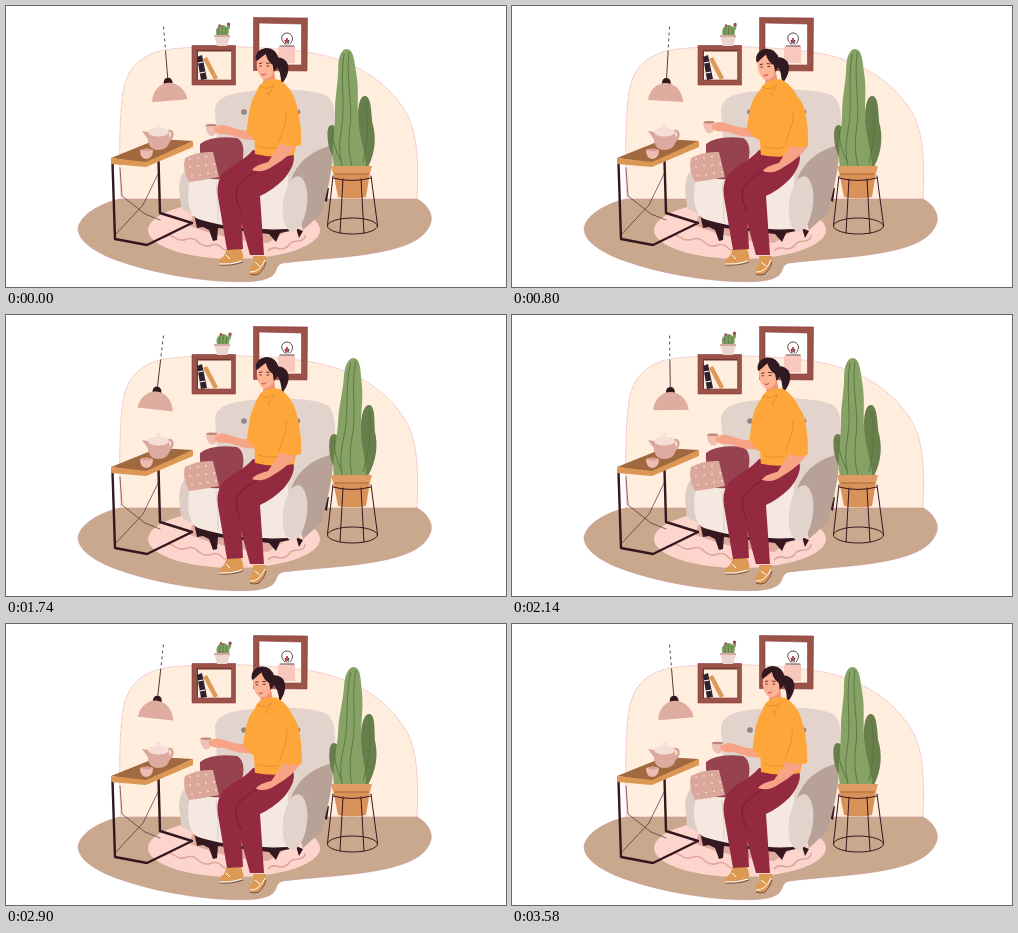
An HTML page that plays this animation: 500x281 px, repeating every 3.6 s.

```html
<!DOCTYPE html>
<html lang="en">
<head>
<meta charset="utf-8">
<title>Tea at home</title>
<style>
  html, body { margin: 0; width: 100%; height: 100%; overflow: hidden; background: #fff; }
  svg { display: block; width: 100vw; height: 100vh; }
  .line { fill: none; stroke: #35171f; stroke-linecap: round; stroke-linejoin: round; }
</style>
</head>
<body>
<svg viewBox="0 0 500 281">
  <!-- room -->
  <path fill="#ffeede" stroke="#d98a9a" stroke-width=".7" stroke-dasharray="1 1" d="M115 194C113 160 113 112 117 86C121 60 138 46 165 43C205 39 254 40 300 46C340 52 373 69 393 96C411 118 413 147 411 194Z"/>
  <path fill="#caa88e" stroke="#c28f8e" stroke-width=".5" d="M113 193H411C421 198 427 208 425 216C420 233 400 241 374 246C344 252 309 253 277 257C269 259 272 265 266 270C256 277 236 276 212 275C172 272 128 262 100 250C81 241 72 232 72 222C75 209 91 199 113 193Z"/>
  <ellipse cx="228" cy="224" rx="86" ry="29" fill="#fdd5cd"/>
  <path fill="none" stroke="#dda79d" stroke-width="1.5" d="M159 232q2-5 9-1q6 5 13 2q7-2 12 4q6 5 13 2q6-2 11 4q6 4 12 1M262 245q4-5 12-2q6 0 9-4q2-4 10-4q6-1 6-6"/>
  <path fill="#dfab9f" d="M186 210L282 224L262 237Q222 235 184 220Z"/>

  <!-- shelf and frame -->
  <path fill="#9b5247" stroke="#8c3a45" stroke-width=".6" fill-rule="evenodd" d="M186 39.500H229.500V79H186ZM190.500 44V74H225.500V44Z"/>
  <path fill="#71382f" d="M190.500 44H225.500V45.500H192V74H190.500Z"/>
  <path fill="#2f202d" d="M191 51L196 49L201 73L195 74Z"/>
  <path stroke="#fff" stroke-width="1.2" d="M192 57l5-1M194 67l5-1"/>
  <path fill="#dc9a58" d="M197 53L201 51L212 72L208 74Z"/>
  <path fill="#9b5247" stroke="#8c3a45" stroke-width=".6" fill-rule="evenodd" d="M247.500 11.500L301.500 12L301 65L247.500 64.500ZM253 17V59H295.500V18Z"/>
  <path fill="#f8c8be" d="M272 41L289 40V57H272Z"/>
  <path class="line" stroke-width=".8" d="M279 38C273 33 276 27 281 27S289 33 284 38M274 40H288M280 38l-1-4 2 2 2-2-1 4"/>
  <path stroke="#c84b55" stroke-width="2" d="M281 32v5"/>

  <!-- small cactus -->
  <g id="sprout">
    <ellipse cx="216.500" cy="26" rx="6.500" ry="7" fill="#7f9e64"/>
    <path stroke="#7f9e64" stroke-width="3" stroke-linecap="round" d="M219 25q4-1 4-5"/>
    <path stroke="#56703f" stroke-width=".7" fill="none" d="M213 22v8M216.500 20v9M220 22v7"/>
    <circle cx="223" cy="18.500" r="1.700" fill="#a94850"/>
    <circle cx="214" cy="19.500" r="1.300" fill="#a94850"/>
  </g>
  <path fill="#ecd5ce" d="M208 29H224V31L221 40H211Z"/>
  <path fill="#d5aaa2" d="M208 29H224V31H208Z"/>

  <!-- lamp -->
  <g id="lamp">
    <path class="line" stroke-width=".8" stroke-dasharray="2 4" d="M157.500 21V45"/>
    <path class="line" stroke-width=".8" d="M157.500 45V75"/>
    <path fill="#35171f" d="M153 78q0-6 4.500-6t4.500 6z"/>
    <path fill="#dfada0" d="M140 95C141 84 149 77 157.500 77S174 84 175.500 95Z"/>
  </g>

  <!-- armchair -->
  <path fill="#35171f" d="M188 208L240 217L285 220L284 225L274 227L270 236L263 228L212 222L211 234L207 235L203 224L197 221L191 222ZM290 222L297 225L293 232ZM316 183L323 182L321 196L316 193Z"/>
  <path fill="#e2d3cc" d="M209 103C211 90 225 87 250 84.500C282 82 309 84 321 90C331 97 330 117 326 148L300 182H214Z"/>
  <g fill="#938480"><circle cx="238" cy="106" r="2.800"/><circle cx="292" cy="106" r="2.400"/></g>
  <path fill="#b8a297" d="M327 139C306 144 289 157 284 178L297 224L316 207C320 188 328 163 327 139Z"/>
  <path fill="#dccdc6" d="M173 182C174 168 179 161 188 161L215 164L210 212C193 211 179 207 175 201Z"/>
  <path fill="#f4e8e0" d="M183 178C187 166 199 168 212 167L282 166V223C245 225 207 219 190 212C182 206 181 190 183 178Z"/>
  <path fill="none" stroke="#dccdc6" d="M210 176Q213 197 212 216"/>
  <ellipse cx="289" cy="198" rx="12" ry="28" fill="#e2d3cc" transform="rotate(7 289 198)"/>
  <path fill="#96424f" d="M194 138Q205 129 231 132Q239 136 237 151L233 174L204 173Q193 160 194 138Z"/>
  <path fill="#dca79b" d="M179 152Q192 145 207 146L213 171Q199 174 183 176Q176 163 179 152Z"/>
  <path fill="none" stroke="#fff0e8" stroke-width="1.500" stroke-linecap="round" stroke-dasharray=".1 8" d="M184 153l22-3M184 161l25-3M186 170l24-4"/>

  <!-- table and tea set -->
  <path class="line" stroke-width=".6" d="M114 162L116 190L139 208L154 214M109 229L137 199L153 166"/>
  <path class="line" stroke-width="2.400" d="M106.500 157L109 233L141 239L186 217M152.500 154L154 207L186 217"/>
  <path fill="#a1693f" d="M105 152L152 133L187 135L140 157Z"/>
  <path fill="#dc9754" d="M105 152L140 156L187 135V141L140 161L105 158Z"/>
  <path fill="none" stroke="#d8a497" stroke-width="2.500" d="M159 126c9-4 10 4 2 11"/>
  <path fill="#d8a497" d="M136 125L142 126L145 135L147 140Z"/>
  <path fill="#dcaa9e" d="M142 126H163Q167 144 151 144Q140 143 142 126Z"/>
  <ellipse cx="152.500" cy="126" rx="10.500" ry="4.500" fill="#f4ded6"/>
  <ellipse cx="152.500" cy="119.500" rx="2" ry="1.800" fill="#f4ded6"/>
  <path fill="#edbcb1" d="M134 144Q141 141 147 144Q147 152 141 153Q134 153 134 144Z"/>
  <ellipse cx="141" cy="144" rx="5" ry="1.200" fill="#d69f92"/>

  <!-- floor cactus -->
  <g id="cactus">
    <g fill="#687f4b">
      <path d="M337 161C326 154 322 142 322 129Q322 118 327 119Q332 120 333 131L341 149Z"/>
      <path d="M348 161C352 142 353 124 353 106C354 94 357 89 361 90C366 92 366 102 367 116C371 130 370 146 362 161Z"/>
    </g>
    <path fill="#86a264" d="M328 162C325 143 330 124 330 106C330 90 334 76 334 60C335 47 339 43 343 43C350 44 350 54 352 68C355 87 351 101 354 123C356 138 360 148 360 162Z"/>
    <path fill="none" stroke="#587344" stroke-width=".9" d="M340 48C335 76 341 98 336 124Q332 144 336 160M345 46C341 76 349 98 344 126Q342 146 346 160M361 97Q365 127 357 157M327 125Q327 140 335 155"/>
  </g>
  <path fill="#d9925a" d="M326 161H365L360 191Q346 194 332 191Z"/>
  <path fill="#c57d48" d="M328 166H363L362 169H329Z"/>
  <path fill="#df9d65" d="M325 160H366L364 167H327Z"/>
  <path class="line" stroke-width="1" d="M327 170L321.500 219M365 170L371.500 219M337 173L334 227M355 173L358 227M327 172Q346 177 365 172"/>
  <ellipse class="line" stroke-width="1" cx="346.500" cy="220" rx="25" ry="8"/>

  <!-- person -->
  <path fill="#dd9a55" d="M221 243L235 243Q239 252 236 255Q224 260 213 258Q213 253 218 250ZM247 250H260Q260 261 253 267Q247 272 243 266Q244 260 248 257Z"/>
  <path fill="none" stroke="#5c3a35" stroke-width=".8" d="M213 259q14 1 24-3M244 268q4 2 9 0q6-6 7-12"/>
  <path fill="none" stroke="#fff" stroke-width="1" d="M213 258q12 1 23-3M244 266q9 1 15-12M220 249l4 4M249 256l5 4"/>
  <path fill="#942a3f" d="M247 144C237 156 222 160 215 170Q210 179 212 191L221 244L237 243L235 206L266 170L264 146Z"/>
  <path fill="#942a3f" d="M250 145L287 147Q291 157 278 173Q267 184 254 190L258 249H244L232 205Q226 187 235 178L262 160Z"/>
  <path fill="none" stroke="#6c1b2e" stroke-width=".8" d="M263 160Q239 169 231 182Q228 190 235 206"/>
  <g id="body">
    <g id="head">
      <path id="tail" fill="#301920" d="M269 52Q276 50 281 56Q286 66 275 79Q276 66 270 59Z"/>
      <path fill="#ef9478" d="M258 69L268 62L270 79Q262 84 257 78Z"/>
      <path fill="#ffb395" d="M251 54Q255 46 263 49L268 57L267 68Q263 74 257 73Q252 69 251 61Z"/>
      <path fill="#301920" d="M250 54Q249 44 260 42Q271 42 273 54Q273 61 268 66L267 59Q262 56 260 48Q257 50 251 55Z"/>
      <path class="line" stroke-width=".8" d="M254 60h1.500M261 60h2M253.500 57.500l2.500-.5M260.500 57l3 .5"/>
      <path fill="none" stroke="#c94e55" stroke-width="1" d="M256 68q2 2 4-.5"/>
    </g>
    <path fill="#ffa63a" d="M254 79Q262 71 274 74Q286 82 290 96L294 123L288 149Q269 153 249 148L248 116Q246 90 254 79Z"/>
    <path fill="none" stroke="#e28b2a" stroke-width=".8" d="M254 80Q261 85 268 79Q267 86 257 90M258 88l-3 10M263 87l1 6M252 140q12 4 21 1"/>
  </g>
  <g id="rearArm">
    <path id="rearHand" fill="#f7a486" d="M275 136L291 139Q283 151 267 160Q256 168 246 164Q249 159 262 156Z"/>
    <path fill="#ffa63a" d="M276 86Q288 88 292 104Q296 124 295 139Q283 143 273 136L277 122Z"/>
    <path fill="none" stroke="#e28b2a" stroke-width=".8" d="M280 104q1 11-3 19L273 136"/>
  </g>
  <g id="frontArm">
    <path fill="#f7a486" d="M250 125L236 124L219 119Q210 118 209 125Q212 129 222 128L238 133L252 134Z"/>
    <path fill="#efbfb3" d="M200 119H212Q212 129 207 130Q201 130 200 119Z"/>
    <path fill="none" stroke="#efbfb3" stroke-width="1.500" d="M211 121q5 0 1 5"/>
    <ellipse cx="206" cy="119" rx="5.500" ry="1.200" fill="#bd8478"/>
    <path fill="#f7a486" d="M209 121l8 0 1 4-9 1z"/>
  </g>
  <path id="sleeve" fill="#ffa63a"/>
</svg>
<script>
const part = id => document.getElementById(id);
const move = (id, value) => part(id).setAttribute('transform', value);
const wave = (t, period, shift) => Math.cos(2 * Math.PI * (t / period + shift));

function draw(now) {
  const t = now % 3600;

  move('lamp', `rotate(${1 - 5.7 * wave(t, 1200, .02)} 157.5 20)`);
  const sway = 1 + 4 * wave(t, 1200, -.39);
  move('cactus', `translate(0 160) skewX(${-Math.atan(sway / 117) * 180 / Math.PI}) translate(0 -160)`);
  move('sprout', `rotate(${1 + 4 * wave(t, 1200, -.39)} 216 31)`);

  const lean = (1 - Math.tanh(2 * wave(t, 1800, .1))) / 2;
  move('body', `rotate(${-3 * lean} 268 150)`);
  move('head', `rotate(${-2 * lean} 263 77)`);
  move('tail', `rotate(${-5 * wave(t, 1200, -.25)} 272 55)`);
  move('rearArm', `translate(${lean} ${lean})`);
  move('rearHand', `translate(${4 * lean} 0)`);

  const x = -4.5 + 4.5 * wave(t, 1800, .085);
  const y = -1.7 + 2.7 * wave(t, 1800, -.13);
  move('frontArm', `translate(${x} ${y})`);
  const cuff = 242 + .7 * x;
  part('sleeve').setAttribute('d',
    `M${254 - 4 * lean} 82Q${cuff + 3} 92 ${cuff + 1} 110L${cuff - 1} ${125 + y}L${cuff + 8} ${135 + y}Q256 138 263 129L268 96Z`);

  requestAnimationFrame(() => draw(performance.now()));
}
draw(performance.now());
</script>
</body>
</html>
```
